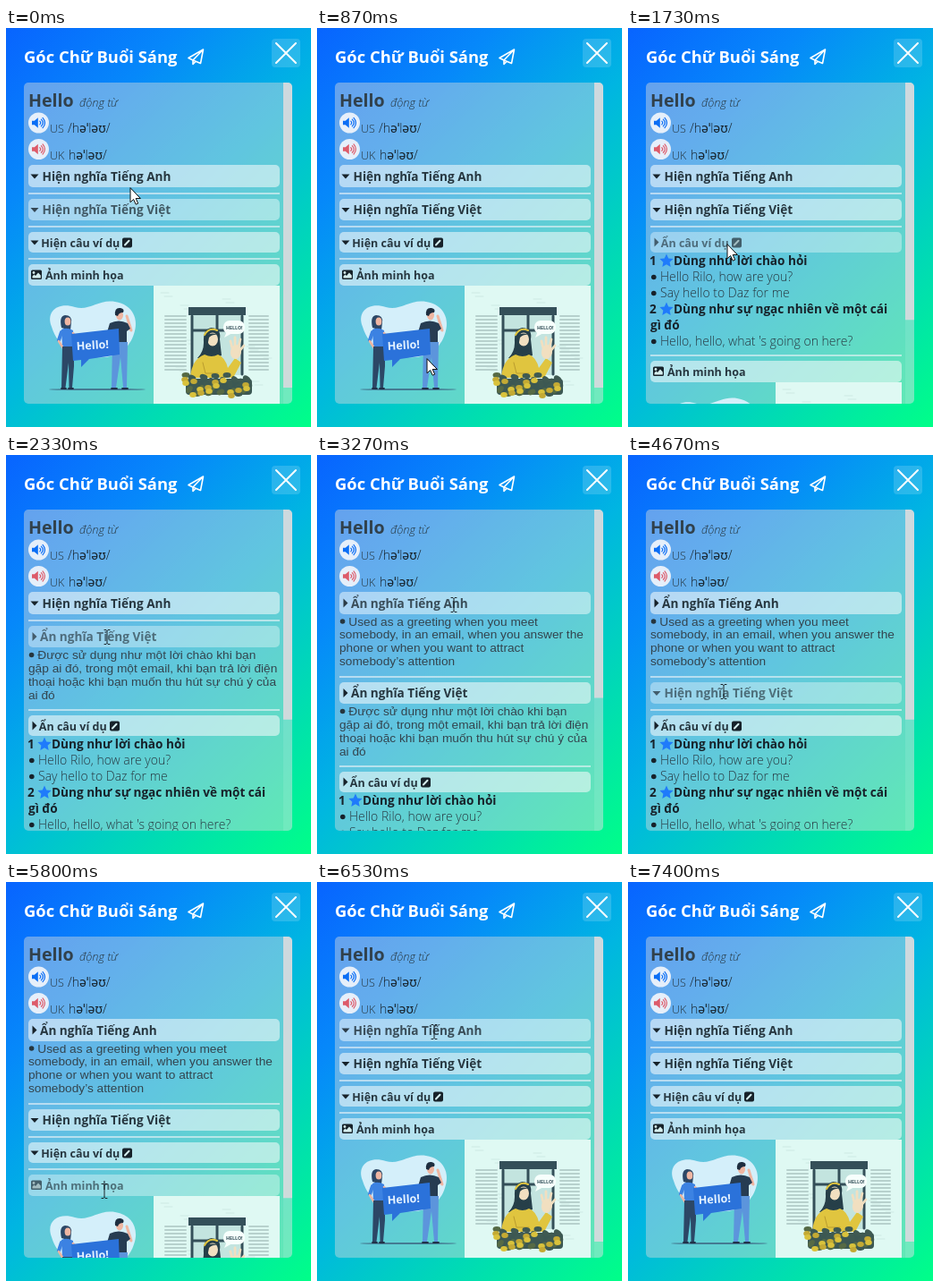
Animation of 341x446 px, one loop 7740 ms. Source, as an HTML page with a canvas:

```html
<!DOCTYPE html>
<html lang="vi">
<head>
<meta charset="utf-8">
<title>Góc Chữ Buổi Sáng</title>
<style>
html, body { margin: 0; width: 100%; height: 100%; overflow: hidden; background: #00b0e0; }
canvas { display: block; width: 100vw; height: 100vh; }
</style>
</head>
<body>
<canvas id="stage"></canvas>
<script>
const W = 341, H = 446, LOOP = 7740, STEP = 1000 / 15, VIEW = 359;
const SANS = '"Open Sans", "Noto Sans", sans-serif';
const ARIAL = '"Liberation Sans", Arial, sans-serif';
const INK = '#26363f', DARK = '#17222a';
const canvas = document.getElementById('stage');
const ctx = canvas.getContext('2d');
const ratio = Math.max(1, window.devicePixelRatio || 1);
canvas.width = W * ratio;
canvas.height = H * ratio;

// Accordion rows: text right edge is [closed, open]
const rows = [
  { top: 153, h: 25, label: 'nghĩa Tiếng Anh', size: 13.6, grow: 63, from: 3270, to: 6530, dim: 0.14, end: [185, 170], body: drawEnglish },
  { top: 191, h: 24, label: 'nghĩa Tiếng Việt', size: 13.6, grow: 63, from: 2330, to: 4670, dim: 0.34, end: [185, 170], body: drawVietnamese },
  { top: 228, h: 23, label: 'câu ví dụ', size: 12.5, grow: 108, from: 1730, to: 5270, dim: 0.34, end: [127, 110], body: drawExamples, pencil: true },
  { top: 264, h: 24, label: 'Ảnh minh họa', size: 12.5, grow: 0, from: 0, to: 0, dim: 0.34, end: [131, 131], body: drawPictures }
];

// Pointer path: time, x, y
const path = [
  [-260, 141, 212], [-130, 140, 200], [0, 139, 179], [130, 137, 167], [270, 134, 172],
  [530, 127, 250], [800, 123, 370], [870, 123, 370], [1130, 116, 290], [1330, 111, 242],
  [1870, 111, 242], [2200, 113, 204], [2870, 113, 204], [3070, 153, 168], [3740, 153, 168],
  [4100, 134, 215], [4470, 107, 265], [4670, 107, 265], [5070, 106, 302], [5330, 106, 302],
  [5670, 110, 342], [5800, 110, 346], [5870, 111, 340], [6000, 116, 272], [6330, 131, 168],
  [6730, 131, 168], [7100, 142, 290], [7400, 152, 447]
];

function pointer(t) {
  for (let i = 1; i < path.length; i++) {
    const [t0, x0, y0] = path[i - 1], [t1, x1, y1] = path[i];
    if (t >= t0 && t < t1) {
      const k = (t - t0) / (t1 - t0);
      return { x: x0 + (x1 - x0) * k, y: y0 + (y1 - y0) * k };
    }
  }
  return null;
}

function layout(t) {
  let shift = 0;
  const items = rows.map(row => {
    const open = t >= row.from && t < row.to;
    const item = { row, open, top: row.top + shift, mid: row.top + shift + row.h / 2 };
    if (open) shift += row.grow;
    return item;
  });
  return { items, height: 378 + shift };
}

function hovered(t) {
  const p = pointer(t);
  if (!p) return -1;
  return layout(t).items.findIndex(i => p.y >= i.top && p.y < i.top + i.row.h);
}

// Averaging the recent past gives the hover fade
function fade(index, t) {
  let sum = 0;
  for (let i = 0; i < 8; i++) if (hovered(t - i * 25) === index) sum++;
  return 1 - rows[index].dim * sum / 8;
}

function text(str, x, y, font, color = INK) {
  ctx.font = font;
  ctx.fillStyle = color;
  ctx.fillText(str, x, y);
}

function box(x, y, w, h, r, color) {
  ctx.fillStyle = color;
  ctx.beginPath();
  ctx.roundRect(x, y, w, h, r);
  ctx.fill();
}

function oval(x, y, rx, ry, color, turn = 0) {
  ctx.fillStyle = color;
  ctx.beginPath();
  ctx.ellipse(x, y, rx, ry, turn, 0, 7);
  ctx.fill();
}

function shape(d, color) {
  ctx.fillStyle = color;
  ctx.fill(new Path2D(d));
}

function line(d, color, width = 1) {
  ctx.strokeStyle = color;
  ctx.lineWidth = width;
  ctx.lineCap = ctx.lineJoin = 'round';
  ctx.stroke(new Path2D(d));
}

function at(x, y, draw) {
  ctx.save();
  ctx.translate(x, y);
  draw();
  ctx.restore();
}

function drawTop() {
  const g = ctx.createLinearGradient(-26, 26, 367, 420);
  g.addColorStop(0, '#0864ff');
  g.addColorStop(0.25, '#0688fa');
  g.addColorStop(0.5, '#00b5e2');
  g.addColorStop(1, '#00ff88');
  ctx.fillStyle = g;
  ctx.fillRect(0, 0, W, H);
  text('Góc Chữ Buổi Sáng', 20, 39, '700 18.4px ' + SANS, '#fff');
  line('M220.5 24L204 33.5L209 36L217.5 39.5ZL209 36V40.5L212 37.5', '#fff', 1.6);
  box(297, 12, 32, 32, 4, 'rgba(255,255,255,.16)');
  line('M302 17L324 39M324 17L302 39', '#fff', 2);
}

function drawSpeaker(y, color) {
  oval(36.5, y, 11.5, 11.5, '#e6effa');
  shape(`M29 ${y - 2.2}h2.8l4 -3.6v11.6l-4 -3.6h-2.8z`, color);
  line(`M37.8 ${y - 1.8}q1.8 1.8 0 3.6M39.4 ${y - 3.8}q3.8 3.8 0 7.6M41 ${y - 5.6}q5 5.6 0 11.2`, color, 1.2);
}

function drawWord() {
  text('Hello', 25, 88, '700 19.6px ' + SANS, '#31414c');
  text('động từ', 82, 88, 'italic 300 12.8px ' + SANS);
  drawSpeaker(106, '#0b6ef5');
  drawSpeaker(135.5, '#dd5b6a');
  text('US', 49, 117, '300 12.5px ' + SANS);
  text('UK', 49, 147, '300 12.5px ' + SANS);
  text('/həˈləʊ/', 69, 117, '300 14px ' + SANS, DARK);
  text('həˈləʊ/', 70, 147, '300 14px ' + SANS, DARK);
}

function paragraph(lines, y) {
  oval(28.6, y - 4.5, 2.8, 2.8, INK);
  lines.forEach((s, i) => text(s, i ? 25 : 35.3, y + i * 14.9, '13.7px ' + ARIAL, '#33444e'));
}

function drawEnglish(mid) {
  paragraph(['Used as a greeting when you meet', 'somebody, in an email, when you answer the',
    'phone or when you want to attract', 'somebody’s attention'], mid + 25);
}

function drawVietnamese(mid) {
  paragraph(['Được sử dụng như một lời chào khi bạn', 'gặp ai đó, trong một email, khi bạn trả lời điện',
    'thoại hoặc khi bạn muốn thu hút sự chú ý của', 'ai đó'], mid + 25);
}

function star(x, y) {
  ctx.beginPath();
  for (let i = 0; i < 10; i++) {
    const r = i % 2 ? 3.8 : 8, a = i * Math.PI / 5 - Math.PI / 2;
    ctx.lineTo(x + r * Math.cos(a), y + r * Math.sin(a));
  }
  ctx.closePath();
  ctx.fillStyle = '#1f7bfb';
  ctx.fill();
}

function drawExamples(mid) {
  const bold = '700 13.6px ' + SANS, light = '300 14px ' + SANS;
  const heading = (n, s, y) => {
    text(n, 24, y, bold, DARK);
    star(43, y - 4.5);
    text(s, 51, y, bold, DARK);
  };
  const example = (s, y) => {
    oval(28.8, y - 4.5, 2.8, 2.8, DARK);
    text(s, 36, y, light);
  };
  const y = mid + 25.5;
  heading('1', 'Dùng như lời chào hỏi', y);
  example('Hello Rilo, how are you?', y + 18);
  example('Say hello to Daz for me', y + 36);
  heading('2', 'Dùng như sự ngạc nhiên về một cái', y + 54);
  text('gì đó', 25, y + 72, bold, DARK);
  example("Hello, hello, what 's going on here?", y + 90);
}

function drawPair() {
  const navy = '#2c4766', skin = '#efb6a2', blue = '#3c82e2', jeans = '#5c95dc';
  shape('M26 46C19 28 34 18 52 24C68 29 78 15 97 18C117 21 124 38 118 54C113 70 99 82 76 80C54 78 33 70 26 46Z', '#d4effa');
  oval(77, 116, 54, 1.1, '#447a92');
  // woman
  shape('M37 47Q34 34 41 33Q49 33 48 41L47 50Z', navy);
  oval(44, 40, 3.4, 4.5, skin);
  shape('M37 49Q43 46 50 50L51 68H38Z', blue);
  line('M37 52L34 61', blue, 4);
  line('M34 62L39 70M50 53L56 60', skin, 2.5);
  shape('M38 68H51L51 90L49 114H45.5L45 86L41.5 114H37Z', navy);
  line('M37 115h5M45 115h5', '#203148', 1.8);
  // man
  line('M111 46L115 50L110 34', skin, 3);
  line('M92 47L89 58L94 64', skin, 3);
  shape('M91 42Q101 37 111 42L114 48L110 51V63H94V51L88 52Z', '#263c52');
  oval(102, 33, 4, 5.4, skin);
  shape('M97 33Q96 24 103 25Q108 26 106 30Q101 30 100 34Z', '#1e2e40');
  shape('M94 63H111L110 114H106L103 80L98 114H93Z', jeans);
  line('M93 115h6M105 115h6', '#203148', 1.8);
  // bubble
  shape('M48 54L101 48L102 77L68 82L59 91L59 83L50 84Z', '#2b72da');
  at(54, 72, () => {
    ctx.rotate(-0.06);
    text('Hello!', 0, 0, '700 12.6px ' + SANS, '#e4f2ff');
  });
}

function drawWindow() {
  const dark = '#344f59', yellow = '#e0c53f', skin = '#f1dfc0';
  ctx.fillStyle = '#dff9f3';
  ctx.fillRect(0, 0, 141, 141);
  for (let i = 0; i < 14; i++) {
    const x = 8 + (i * 37) % 116, y = 8 + (i * 23) % 108;
    line(`M${x} ${y}h9M${x + 4} ${y + 4}h9`, '#cde9e3', 1);
  }
  // shutters and frame
  for (let y = 34; y < 96; y += 4) line(`M13 ${y}h23M107 ${y}h21`, '#b7d1cd', 2);
  box(39, 24, 64, 9, 0, dark);
  box(42, 33, 58, 67, 0, '#c3e4df');
  line('M43 34V99M99 34V99M71 33V50M43 50H99', dark, 3);
  // girl
  shape('M56 64Q55 48 65 47Q76 48 74 60L76 78L62 84L49 81Q56 74 56 64Z', '#263f49');
  oval(66, 60, 6, 7.5, skin);
  shape('M58 62Q59 50 72 55Q66 54 62 58L60 68Z', '#263f49');
  line('M57 55Q62 46 71 50', yellow, 2);
  shape('M41 102Q43 82 57 77Q65 81 72 77Q80 80 83 92L91 81L98 86L89 103H41Z', yellow);
  line('M55 86L58 98H72', '#b99c2e', 1);
  oval(92, 74, 6, 8, skin, 0.2);
  line('M88 70L86 62M91 67L91 58M95 68L97 60M97 72L101 67', skin, 2.8);
  box(78, 39, 24, 15, 7, '#f6fffc');
  shape('M82 51L79 58L88 53Z', '#f6fffc');
  text('HELLO!', 81, 49, '700 5.3px ' + SANS, dark);
  // flower box
  box(36, 104, 74, 18, 4, '#3c5853');
  for (let i = 0; i < 26; i++) {
    const x = 36 + (i * 29) % 74, y = 100 + (i * 7) % 22;
    oval(x, y, 4.5, 3, i % 3 ? '#3f5a52' : '#566a45', i);
  }
  for (let i = 0; i < 16; i++) {
    oval(35 + (i * 17) % 76, 105 + (i * 11) % 19, 3.8, 3, i % 2 ? '#d9c23c' : '#c4aa34');
  }
}

function drawPictures(mid) {
  at(25, mid + 12, drawPair);
  at(165, mid + 12, drawWindow);
}

function drawHeader({ row, open, top, mid }, alpha) {
  ctx.save();
  ctx.globalAlpha = alpha;
  box(25, top, 281, row.h, 5, 'rgba(248,252,252,.56)');
  const font = `700 ${row.size}px ${SANS}`;
  if (!row.grow) {
    box(28, mid - 5.5, 12, 10.5, 1.5, DARK);
    oval(31, mid - 2.5, 1.4, 1.4, '#d5eeee');
    shape(`M29.5 ${mid + 3.5}v-2l2 -2l1.5 1.5l3 -3.5l2.8 3v3z`, '#d5eeee');
    text(row.label, 44, mid + 4.5, font);
  } else {
    shape(open ? `M29.5 ${mid - 5}l5 5l-5 5z` : `M27.5 ${mid - 2}h9l-4.5 5z`, DARK);
    const x = (open ? 38 : 40.5) - (row.pencil ? 1.2 : 0);
    text((open ? 'Ẩn ' : 'Hiện ') + row.label, x, mid + 5, font);
    if (row.pencil) {
      const ix = open ? 116 : 130;
      box(ix, mid - 5, 11, 11, 2, DARK);
      line(`M${ix + 3} ${mid + 3}L${ix + 7.5} ${mid - 1.8}`, '#d5eeee', 2);
    }
  }
  ctx.restore();
}

function drawPointer(t, items) {
  const p = pointer(t);
  if (!p) return;
  const onText = items.some(i => Math.abs(p.y - i.mid) < 9 && p.x > 28 && p.x < i.row.end[+i.open]);
  at(Math.round(p.x), Math.round(p.y), () => {
    if (onText) {
      line('M-3 -8.5H-1L0 -7.5L1 -8.5H3M0 -7.5V6.5M-3 7.5H-1L0 6.5L1 7.5H3', '#1b252b', 1);
    } else {
      const arrow = 'M0 0V15.8L3.6 12.5L6.2 18.2L8.7 17.1L6.2 11.5H11Z';
      shape(arrow, '#fff');
      line(arrow, '#111', 1);
    }
  });
}

function render(t) {
  const { items, height } = layout(t);
  ctx.setTransform(canvas.width / W, 0, 0, canvas.height / H, 0, 0);
  drawTop();
  ctx.save();
  ctx.beginPath();
  ctx.roundRect(20, 61, 300, VIEW, 5);
  ctx.clip();
  ctx.fillStyle = 'rgba(210,216,220,.46)';
  ctx.fillRect(20, 61, 300, VIEW);
  drawWord();
  items.forEach((item, i) => {
    if (i) box(25, item.top - 7, 281, 2, 0, 'rgba(240,245,248,.6)');
    if (item.open || !item.row.grow) item.row.body(item.mid);
    drawHeader(item, fade(i, t));
  });
  box(310, 61, 10, VIEW, 0, 'rgba(255,255,255,.1)');
  box(310, 61, 10, VIEW * VIEW / height, 0, 'rgba(214,219,222,.92)');
  ctx.restore();
  drawPointer(t, items);
}

const start = performance.now();
function tick() {
  const t = (performance.now() - start) % LOOP;
  render(Math.round(Math.floor((t + 4) / STEP) * STEP / 10) * 10);
  requestAnimationFrame(tick);
}
tick();
</script>
</body>
</html>
```
